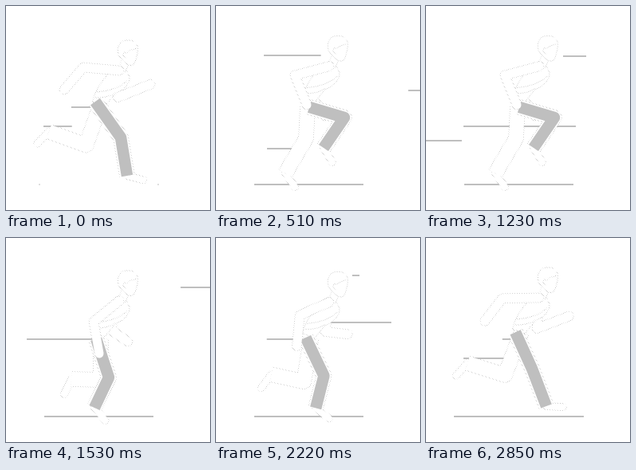
Animation of 256x256 px, one loop 2880 ms. Source, as an HTML page with a canvas:

```html
<!DOCTYPE html>
<html lang="en">
<head>
<meta charset="utf-8">
<title>Runner</title>
<style>
html, body { margin: 0; width: 100%; height: 100%; overflow: hidden; background: #fff; }
canvas { display: block; width: 256px; height: 256px; }
</style>
</head>
<body>
<canvas id="stage" width="256" height="256"></canvas>
<script>
const ctx = document.getElementById('stage').getContext('2d');
const STRIDE = 720, HALF = STRIDE / 2, LOOP = 2880, STEP = 30;
const GREY = '#bfbfbf', EDGE = speckle();

// Key poses: time, knee, ankle
const LEG = [
  [0, 144, 165, 152, 213],
  [90, 129, 175, 111, 213],
  [150, 113, 166, 87, 210],
  [330, 99, 172, 52, 157],
  [450, 119, 178, 82, 177],
  [510, 161, 140, 135, 178],
  [600, 160, 142, 164, 190],
  [690, 133, 164, 151, 211]
];

// Key poses: time, elbow, hand
const ARM = [
  [0, 97, 77, 73, 105],
  [90, 110, 105, 117, 145],
  [345, 140, 114, 181, 97],
  [450, 131, 115, 153, 130],
  [510, 99, 87, 114, 124]
];

// y, from, to, head start, tail start
const STREAKS = [
  [151, 256, 47, 883, 977],
  [63, 262, 172, 780, 1055],
  [169, 150, -10, 824, 925],
  [127, 115, -20, 1339, 1530],
  [127, 100, 0, 650, 808],
  [62, 290, 60, 1413, 1498],
  [106, 270, 130, 420, 600],
  [179, 150, 64, 200, 359],
  [47, 180, 25, 740, 792]
];

const clamp = u => Math.min(1, Math.max(0, u));
const mod = (a, n) => ((a % n) + n) % n;
const turn = (t, period) => 2 * Math.PI * t / period;

// Broken, dotted outline paint
function speckle() {
  const tile = document.createElement('canvas');
  tile.width = tile.height = 3;
  const c = tile.getContext('2d');
  c.fillStyle = '#c4c4c4';
  for (let i = 0; i < 3; i++) c.fillRect(i, i, 1, 1);
  return ctx.createPattern(tile, 'repeat');
}

// Periodic smooth interpolation through key poses
function pose(rows, time) {
  const n = rows.length, t = mod(time, STRIDE);
  let i = n - 1;
  while (rows[i][0] > t) i--;
  const row = k => rows[mod(k, n)];
  const at = k => row(k)[0] + Math.floor(k / n) * STRIDE;
  const span = at(i + 1) - at(i), u = (t - at(i)) / span;
  const u2 = u * u, u3 = u2 * u;
  return row(i).slice(1).map((a, j) => {
    const b = row(i + 1)[j + 1];
    const m0 = (b - row(i - 1)[j + 1]) / (at(i + 1) - at(i - 1)) * span;
    const m1 = (row(i + 2)[j + 1] - a) / (at(i + 2) - at(i)) * span;
    return a * (2 * u3 - 3 * u2 + 1) + m0 * (u3 - 2 * u2 + u)
      + b * (3 * u2 - 2 * u3) + m1 * (u3 - u2);
  });
}

// Quick drop on landing, slow recovery
function bob(time) {
  const s = mod(time + 30, HALF);
  const rise = (1 - Math.cos(Math.PI * clamp((s - 60) / 150))) / 2;
  return 6 * clamp(s / 30) * (1 - rise) - 1;
}

function stroke(pts, width, color, cap) {
  ctx.beginPath();
  for (let i = 0; i < pts.length; i += 2) ctx.lineTo(pts[i], pts[i + 1]);
  ctx.lineCap = cap;
  ctx.lineJoin = 'round';
  ctx.lineWidth = width;
  ctx.strokeStyle = color;
  ctx.stroke();
}

function tube(pts, width, cap) {
  stroke(pts, width + 1.6, EDGE, cap);
  stroke(pts, width, '#fff', cap);
}

function thin(trace, fill) {
  ctx.beginPath();
  trace();
  if (fill) {
    ctx.fillStyle = '#fff';
    ctx.fill();
  }
  ctx.lineWidth = 1;
  ctx.strokeStyle = EDGE;
  ctx.stroke();
}

function leg(time, filled) {
  const [kx, ky, ax, ay] = pose(LEG, time);
  const hx = 116 - 4 * Math.cos(turn(time, STRIDE));
  const hy = 122.5 + 5 * Math.sin(turn(time - 30, HALF));
  const foot = Math.atan2(ay - ky, ax - kx) - Math.PI / 2 + 0.42;
  const limb = [hx, hy, kx, ky, ax, ay];
  tube([ax, ay, ax + 21 * Math.cos(foot), ay + 21 * Math.sin(foot)], 8, 'round');
  tube(limb, 18, 'butt');
  if (filled) stroke(limb, 14.5, GREY, 'butt');
}

function arm(time) {
  tube([142, 76 + bob(time), ...pose(ARM, time)], 11, 'round');
}

function torso() {
  thin(() => {
    ctx.moveTo(137, 72);
    ctx.quadraticCurveTo(150, 69, 155, 84);
    ctx.quadraticCurveTo(157, 96, 136, 106);
    ctx.lineTo(124, 121);
    ctx.lineTo(108, 115);
    ctx.quadraticCurveTo(117, 88, 137, 72);
  }, true);
  thin(() => {
    ctx.moveTo(114, 103);
    ctx.quadraticCurveTo(140, 101, 153, 88);
    ctx.moveTo(111, 110);
    ctx.quadraticCurveTo(127, 111, 137, 104);
  });
}

function head() {
  tube([145, 76, 151, 62], 9, 'butt');
  thin(() => {
    ctx.moveTo(141, 56);
    ctx.bezierCurveTo(138, 43, 145, 37, 154, 38);
    ctx.bezierCurveTo(167, 38, 167, 49, 163, 62);
    ctx.quadraticCurveTo(161, 72, 154, 69);
    ctx.quadraticCurveTo(147, 66, 141, 56);
  }, true);
  thin(() => {
    ctx.moveTo(164, 48);
    ctx.quadraticCurveTo(155, 50, 151, 54);
    ctx.quadraticCurveTo(147, 51, 147, 57);
    ctx.lineTo(150, 61);
  });
}

function shifted(dy, part) {
  ctx.save();
  ctx.translate(0, dy);
  part();
  ctx.restore();
}

const line = (x1, x2, y) => stroke([x1, y, x2, y], 2, GREY, 'butt');

// The head runs ahead; the tail follows at a pace set by the length
function streaks(time) {
  for (const [y, from, to, headStart, tailStart] of STREAKS) {
    const t = headStart + mod(time - headStart, 2 * STRIDE);
    const x = (start, span) =>
      from + (to - from) * Math.pow(clamp((t - start) / span), 1.55);
    line(x(headStart, 250), x(tailStart, 2.5 * (from - to)), y);
  }
}

// Widens around each landing; only its tips show at the impact
function ground(time) {
  const d = Math.abs(mod(time + 30 + HALF / 2, HALF) - HALF / 2);
  const x = 48 - 13 * clamp(1 - d / 60), end = 233 - x;
  if (time % HALF) {
    line(x, end, 224);
  } else {
    line(x, x + 1, 224);
    line(end - 1, end, 224);
  }
}

function draw(time) {
  const dy = bob(time);
  ctx.fillStyle = '#fff';
  ctx.fillRect(0, 0, 256, 256);
  streaks(time);
  ground(time);
  arm(time + HALF);
  leg(time + HALF, false);
  shifted(dy, torso);
  leg(time, true);
  shifted(dy, head);
  arm(time);
}

const start = performance.now();
function tick() {
  const time = (performance.now() - start) % LOOP;
  draw(Math.floor(time / STEP) * STEP);
  requestAnimationFrame(tick);
}
tick();
</script>
</body>
</html>
```
